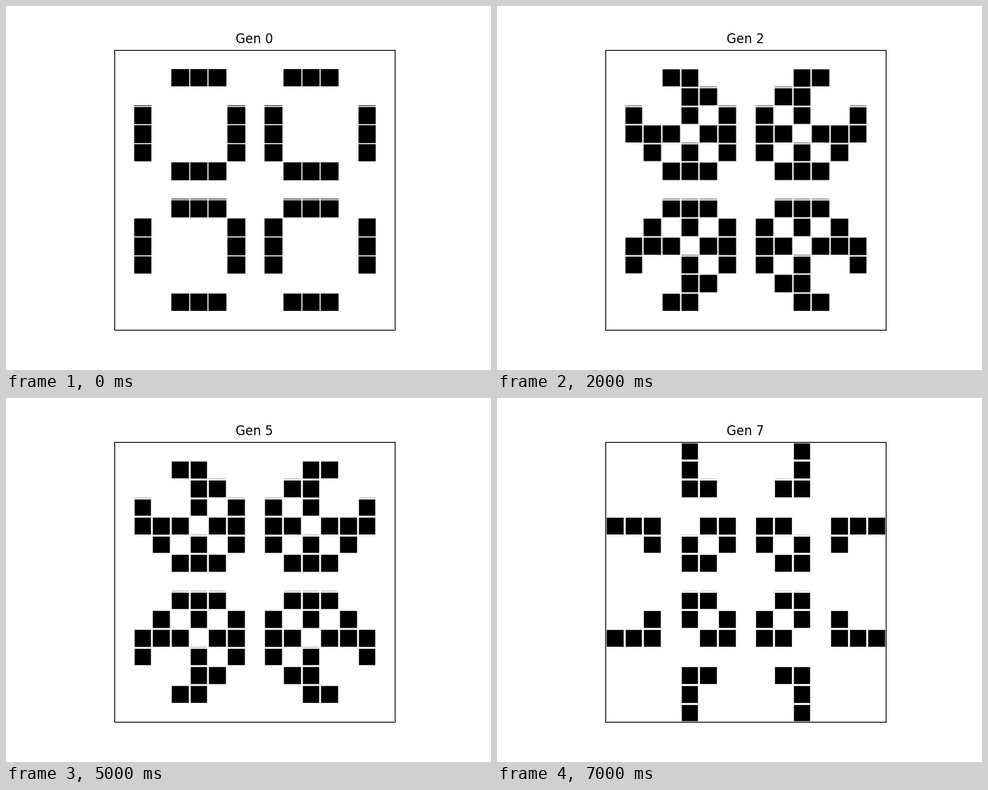
A matplotlib script that plays this animation: 640x480 px, repeating every 8000 ms.

```python
import numpy as np
import matplotlib.pyplot as plt
from matplotlib.animation import FuncAnimation

SIZE = 15
GENERATIONS = 8


def pulsar():
    grid = np.zeros((SIZE, SIZE), dtype=int)
    bars = [3, 4, 5, 9, 10, 11]
    for edge in (1, 6, 8, 13):
        grid[edge, bars] = 1
        grid[bars, edge] = 1
    return grid


def step(grid):
    """One Game of Life generation; cells beyond the border are dead."""
    padded = np.pad(grid, 1)
    block = sum(padded[r:r + SIZE, c:c + SIZE]
                for r in range(3) for c in range(3))
    return ((block == 3) | ((block == 4) & (grid == 1))).astype(int)


history = [pulsar()]
while len(history) < GENERATIONS:
    history.append(step(history[-1]))

fig, ax = plt.subplots(figsize=(6.4, 4.8), dpi=100)
image = ax.imshow(history[0], cmap="binary", vmin=0, vmax=1,
                  interpolation="nearest")
ax.set_xticks([])
ax.set_yticks([])
title = ax.set_title("Gen 0")


def grid_layer():
    style = dict(color="white", linewidth=1)
    marks = np.arange(SIZE + 1) - 0.5
    return [draw(m, **style) for m in marks for draw in (ax.axhline, ax.axvline)]


# Each generation lays one more white grid on top, so soft line edges build up.
layers = [grid_layer() for _ in range(GENERATIONS)]
ax.set_xlim(-0.5, SIZE - 0.5)
ax.set_ylim(SIZE - 0.5, -0.5)


def update(gen):
    image.set_data(history[gen])
    title.set_text(f"Gen {gen}")
    for i, layer in enumerate(layers):
        for line in layer:
            line.set_visible(i <= gen)
    return [image, title]


anim = FuncAnimation(fig, update, frames=GENERATIONS, interval=1000,
                     repeat=True, repeat_delay=0)
plt.show()
```
